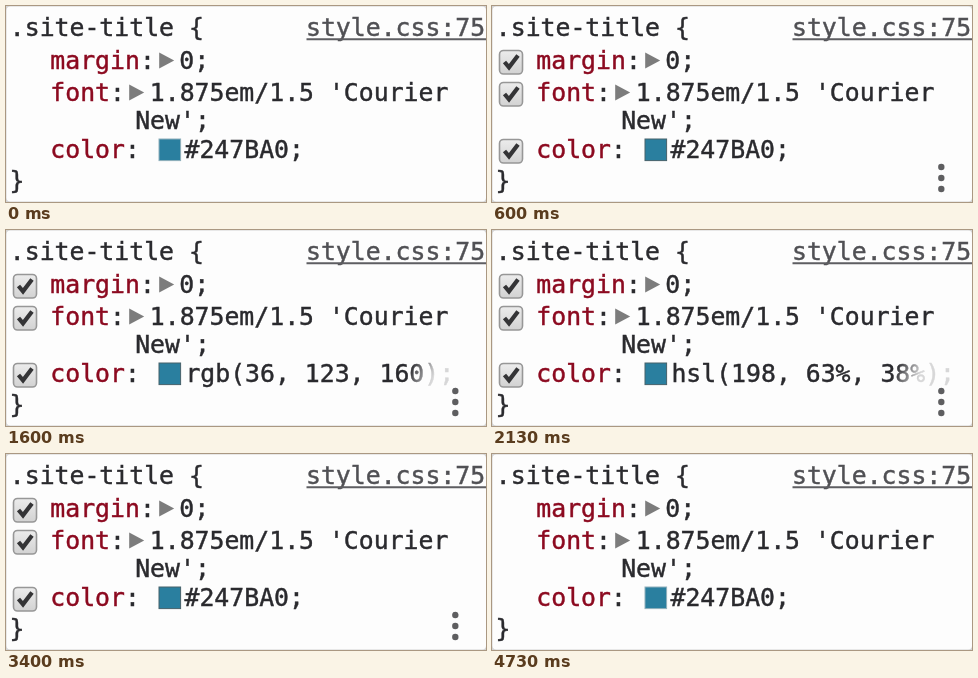
Write an HTML page that moves like this. It is 480 by 196 pixels and loops after 4.79 s.

```html
<!DOCTYPE html>
<html lang="en">
<head>
<meta charset="utf-8">
<title>Style rule</title>
<style>
  html, body { margin: 0; width: 100%; height: 100%; overflow: hidden; background: #fdfdfd; }
  svg { display: block; width: 100vw; height: 100vh; }
  text {
    font: 24.8px "DejaVu Sans Mono", monospace;
    fill: #2a2a2e; stroke: #2a2a2e; stroke-width: .45px;
    white-space: pre;
  }
  .prop { fill: #8c0a20; stroke: #8c0a20; }
  .link { fill: #505054; stroke: #505054; }
  .arrow { fill: #7c7c7c; }
</style>
</head>
<body>
<svg viewBox="0 0 480 196">
  <defs>
    <linearGradient id="face" x2="0" y2="1">
      <stop stop-color="#ececec"/>
      <stop offset="1" stop-color="#d2d2d2"/>
    </linearGradient>
    <linearGradient id="veil" gradientUnits="userSpaceOnUse" x1="404" y1="138" x2="427" y2="147">
      <stop stop-color="#fdfdfd" stop-opacity="0"/>
      <stop offset="1" stop-color="#fdfdfd" stop-opacity=".82"/>
    </linearGradient>
    <g id="check">
      <rect x="-11.5" y="-11.5" width="23" height="23.5" rx="4" fill="url(#face)" stroke="#979797" stroke-width="1.6"/>
      <path d="M-6.5 0L-2 5.3L7 -6.5" fill="none" stroke="#343436" stroke-width="4.2"/>
    </g>
    <path id="arrow" class="arrow" d="M0 -8L15 0L0 8Z"/>
  </defs>

  <rect width="480" height="196" fill="#d4d4d4"/>
  <rect x=".5" y=".6" width="479.5" height="194.8" rx="4" fill="#fdfdfd"/>

  <text x="3.8" y="29.5">.site-title {</text>
  <text class="link" x="300" y="29.5">style.css:75</text>
  <path d="M300.5 33.2H480" stroke="#5e5e62" stroke-width="2"/>

  <text x="44.3" y="62.7"><tspan class="prop">margin</tspan>:</text>
  <use href="#arrow" x="153.2" y="54.5"/>
  <text x="173.3" y="62.7">0;</text>

  <text x="44.3" y="94.6"><tspan class="prop">font</tspan>:</text>
  <use href="#arrow" x="123.2" y="86.5"/>
  <text x="143.8" y="94.6">1.875em/1.5 'Courier</text>
  <text x="129.2" y="123.2">New';</text>

  <text x="44.3" y="151.8"><tspan class="prop">color</tspan>:</text>
  <rect id="swatch" x="153" y="133" width="21.6" height="21.6" fill="#2a7f9f"/>
  <text id="value" x="178.5" y="151.8">#247BA0;</text>
  <text x="3.4" y="182.7">}</text>

  <g id="hover" visibility="hidden">
    <rect x="400" y="130" width="64" height="60" fill="url(#veil)"/>
    <use href="#check" x="19" y="56"/>
    <use href="#check" x="19" y="88"/>
    <use href="#check" x="19" y="145"/>
    <g fill="#5e5e60">
      <circle cx="449.3" cy="161" r="3.2"/>
      <circle cx="449.3" cy="172" r="3.2"/>
      <circle cx="449.3" cy="183" r="3.2"/>
    </g>
  </g>
</svg>
<script>
  const LOOP = 4790;
  const HOVER = { from: 200, to: 3470 };
  const FORMATS = [
    { at: 0, x: 178.5, text: '#247BA0;' },
    { at: 670, x: 179.4, text: 'rgb(36, 123, 160);' },
    { at: 1870, x: 179.4, text: 'hsl(198, 63%, 38%);' },
    { at: 3070, x: 178.5, text: '#247BA0;' }
  ];
  const value = document.getElementById('value');
  const hover = document.getElementById('hover');
  const swatch = document.getElementById('swatch');

  function draw(t) {
    const format = FORMATS.filter(f => f.at <= t).pop();
    if (value.textContent !== format.text) value.textContent = format.text;
    value.setAttribute('x', format.x);
    const shown = t >= HOVER.from && t < HOVER.to;
    hover.setAttribute('visibility', shown ? 'visible' : 'hidden');
    swatch.setAttribute('stroke', shown ? '#47626b' : '#8fb0bb');
  }

  const start = performance.now();
  function tick() {
    draw((performance.now() - start) % LOOP);
    requestAnimationFrame(tick);
  }
  tick();
</script>
</body>
</html>
```
